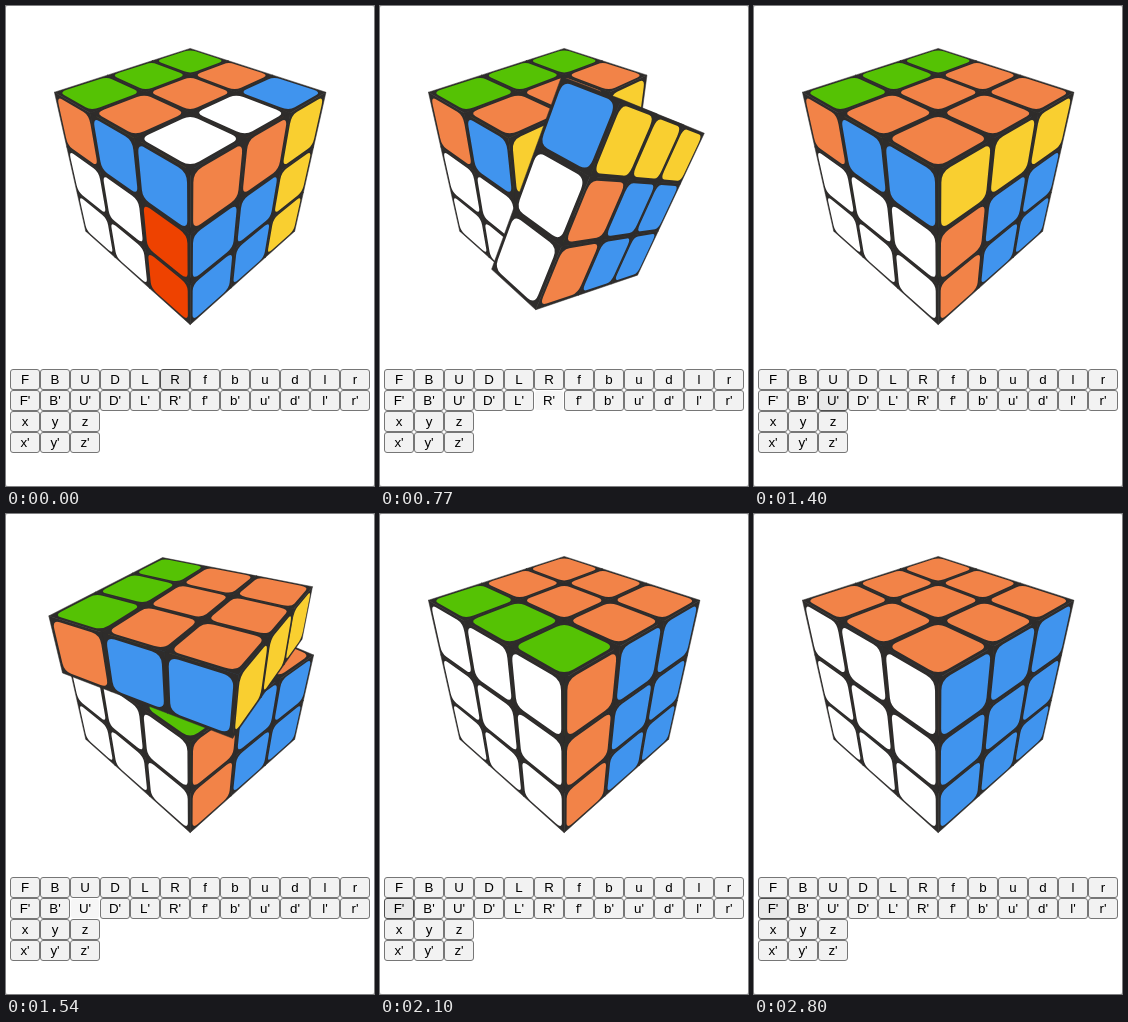
These frames come from a looping animation (368x480 px, 2.87 s). An HTML page:

```html
<!DOCTYPE html>
<html lang="en">
<head>
<meta charset="utf-8">
<title>Cube moves</title>
<style>
  html, body { margin: 0; width: 100%; height: 100%; overflow: hidden; background: #c4c4c4; }
  svg { display: block; width: 368px; height: 480px; background: #fff; border-radius: 2px; }
  .key rect { fill: #f2f2f2; stroke: #767676; }
  .key.hover rect { fill: #e9e9e9; stroke: #4f4f4f; }
  .key.down rect { fill: #f6f6f6; stroke: #fff; }
  text { font: 13.333px "Liberation Sans", Arial, sans-serif; text-anchor: middle; fill: #000; }
</style>
</head>
<body>
<svg viewBox="0 0 368 480">
  <g id="cube"></g>
  <g id="keys"></g>
</svg>
<script>
const LOOP = 2870, STEP = 70, TURN = 105;
const DARK = '#2e2c2b';
const CELL = 2 / 3, HALF = CELL / 2;
const INSET = 0.052 * CELL, ROUND = 0.148 * CELL;

// colour pairs for the + and - side of x, y and z
const COLORS = [['#4094ee', '#55c204'], ['#f28348', '#ee4200'], ['#ffffff', '#f9cf30']];

// turns seen in the loop: axis, start time
const TURNS = [[0, 700], [1, 1522.5], [2, 2240]];

// which key is under the pointer, and when it is held down
const HOVER = [["R", 0], ["R'", 630], ["U'", 1330], ["F'", 2100]];
const DOWN = [[770, 840], [1540, 1680], [2310, 2380]];

// camera, aimed LIFT below the middle of the cube
const DIST = 4.625, LIFT = 0.15, PITCH = 37 * Math.PI / 180, FOCUS = 386.2, CX = 184.2, CY = 177.3;
const cosP = Math.cos(PITCH), sinP = Math.sin(PITCH);
const side = (DIST * cosP + LIFT * sinP) * Math.SQRT1_2;
const EYE = [side, DIST * sinP - LIFT * cosP, side];

const dot = (a, b) => a[0] * b[0] + a[1] * b[1] + a[2] * b[2];
const sub = (a, b) => a.map((v, i) => v - b[i]);
const add = (a, b, k) => a.map((v, i) => v + b[i] * k);

function project([x, y, z]) {
  const u = (x - z) * Math.SQRT1_2, s = (x + z) * Math.SQRT1_2;
  const k = FOCUS / (DIST - cosP * s - sinP * y);
  return (CX + u * k).toFixed(2) + ' ' + (CY - (cosP * y - sinP * s + LIFT) * k).toFixed(2);
}

function rotate(v, axis, angle) {
  const b = (axis + 1) % 3, c = (axis + 2) % 3, r = v.slice();
  r[b] = v[b] * Math.cos(angle) - v[c] * Math.sin(angle);
  r[c] = v[b] * Math.sin(angle) + v[c] * Math.cos(angle);
  return r;
}

// a cubelet is its centre and its three local axes
function solved() {
  const list = [], at = [-CELL, 0, CELL];
  for (const x of at) for (const y of at) for (const z of at)
    list.push({ pos: [x, y, z], axes: [[1, 0, 0], [0, 1, 0], [0, 0, 1]] });
  return list;
}

function turnLayer(list, axis, angle) {
  return list.map(c => {
    if (c.pos[axis] < HALF) return { ...c, moving: false };
    return {
      pos: rotate(c.pos, axis, angle),
      axes: c.axes.map(a => rotate(a, axis, angle)),
      moving: true
    };
  });
}

const scrambled = [2, 1, 0].reduce((list, axis) => turnLayer(list, axis, -Math.PI / 2), solved());

function cubeAt(t) {
  let list = scrambled.map(c => ({ ...c, moving: false }));
  for (const [axis, start] of TURNS) {
    const p = Math.min(1, (t - start) / TURN);
    if (p <= 0) break;
    list = turnLayer(list, axis, p * Math.PI / 2);
    if (p === 1) list.forEach(c => { c.moving = false; });
  }
  const far = c => { const d = sub(EYE, c.pos); return dot(d, d); };
  return list.sort((a, b) => a.moving - b.moving || far(b) - far(a));
}

function facePaths(mid, e, f, color) {
  const at = (i, j) => project(add(add(mid, e, i), f, j));
  const corners = [[1, 1], [-1, 1], [-1, -1], [1, -1]];
  const base = corners.map(([i, j]) => at(i * HALF, j * HALF)).join('L');
  const r = HALF - INSET, q = r - ROUND;
  const sticker = corners.map(([i, j], n) => {
    const ends = [at(i * r, j * q), at(i * q, j * r)];
    if (n % 2) ends.reverse();
    return ends[0] + 'Q' + at(i * r, j * r) + ' ' + ends[1];
  }).join('L');
  return `<path d="M${base}Z" fill="${DARK}" stroke="${DARK}" stroke-width=".5"/>` +
         `<path d="M${sticker}Z" fill="${color}"/>`;
}

function drawCube(t) {
  let out = '';
  for (const { pos, axes } of cubeAt(t)) {
    axes.forEach((n, i) => [1, -1].forEach((sign, k) => {
      const mid = add(pos, n, sign * HALF);
      if (sign * dot(n, sub(EYE, mid)) > 0)
        out += facePaths(mid, axes[(i + 1) % 3], axes[(i + 2) % 3], COLORS[i][k]);
    }));
  }
  document.getElementById('cube').innerHTML = out;
}

const letters = 'F B U D L R f b u d l r'.split(' '), whole = ['x', 'y', 'z'];
const prime = s => s + "'";
const rows = [letters, letters.map(prime), whole, whole.map(prime)];
const keyBox = document.getElementById('keys');
keyBox.innerHTML = rows.map((row, j) => row.map((name, i) => {
  const x = 4 + i * 30, y = 363 + j * 21;
  return `<g class="key" data-name="${name}">` +
    `<rect x="${x + .5}" y="${y + .5}" width="29" height="20" rx="2.5"/>` +
    `<text x="${x + 15}" y="${y + 15}">${name}</text></g>`;
}).join('')).join('');
const keys = [...keyBox.children];

function drawKeys(t) {
  const name = HOVER.filter(h => t >= h[1]).pop()[0];
  const down = DOWN.some(([a, b]) => t >= a && t < b);
  for (const key of keys) {
    const on = key.dataset.name === name;
    key.setAttribute('class', 'key' + (on ? (down ? ' down' : ' hover') : ''));
  }
}

let shown = -1;
function frame() {
  const t = Math.floor(performance.now() % LOOP / STEP) * STEP;
  if (t !== shown) {
    shown = t;
    drawCube(t);
    drawKeys(t);
  }
  requestAnimationFrame(frame);
}
frame();
</script>
</body>
</html>
```
